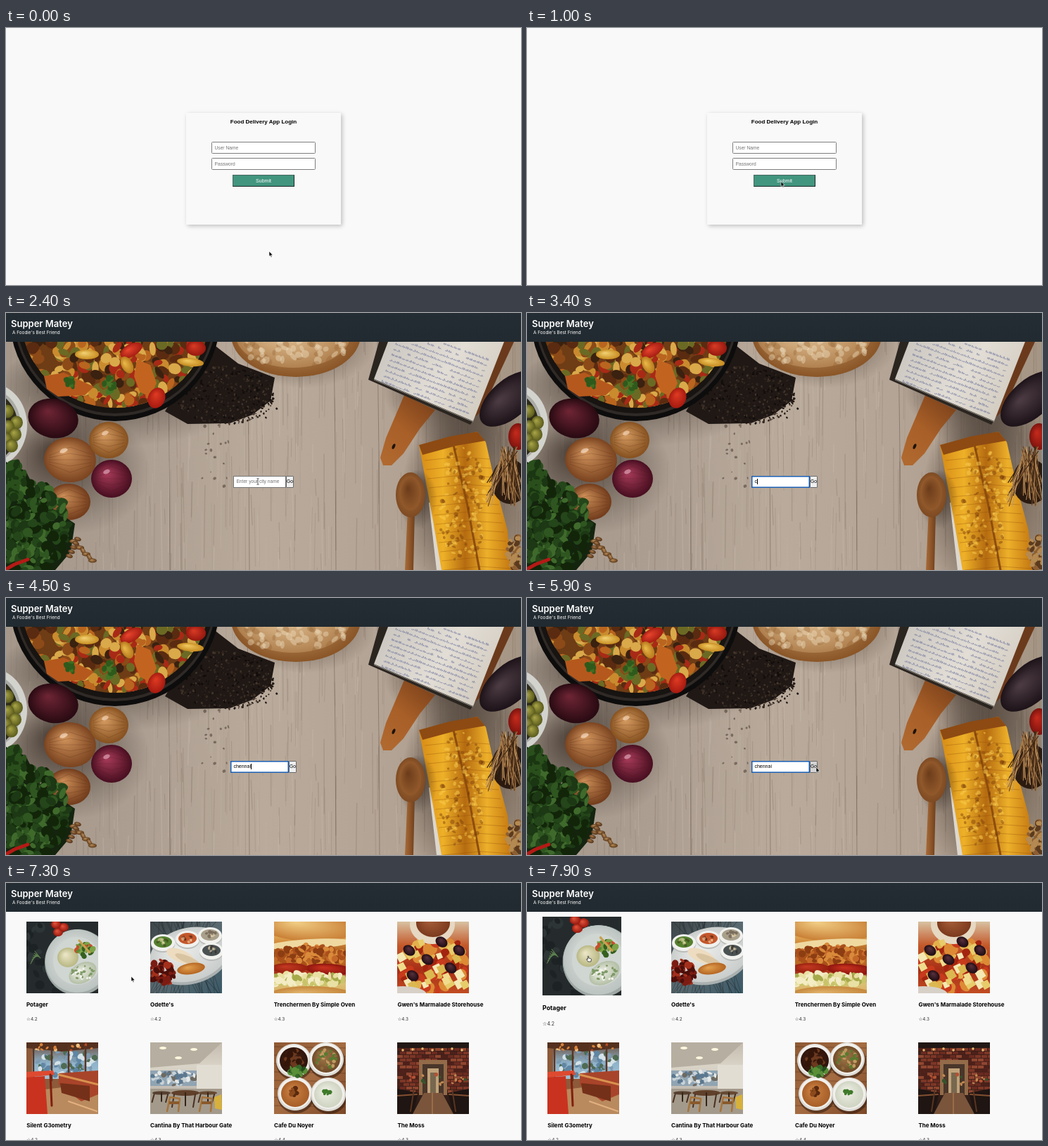
An HTML page with a canvas for the animation above (8000 ms loop, 732 by 366 pixels).

```html
<!DOCTYPE html>
<html lang="en">
<head>
<meta charset="utf-8">
<title>Food delivery demo</title>
<style>
html, body { margin: 0; width: 100%; height: 100%; overflow: hidden; background: #f9f9f9; }
#stage { position: relative; width: 732px; height: 366px; overflow: hidden; font: 6.67px "Liberation Sans", Arial, sans-serif; }
#stage * { box-sizing: border-box; }
.page, .abs { position: absolute; }
.page { inset: 0; background: #f9f9f9; }

#login { animation: login 8s step-end infinite; }
#search { animation: search 8s step-end infinite; }
#list { animation: list 8s step-end infinite; }
#head { left: 0; top: 0; width: 732px; height: 40.5px; background: linear-gradient(#242d33, #212a30); color: #fff; animation: head 8s step-end infinite; }
@keyframes login { 0% { visibility: visible; } 17.5%, 100% { visibility: hidden; } }
@keyframes search { 0% { visibility: hidden; } 17.5% { visibility: visible; } 76.25%, 100% { visibility: hidden; } }
@keyframes list { 0% { visibility: hidden; } 76.25%, 100% { visibility: visible; } }
@keyframes head { 0% { visibility: hidden; } 17.5%, 100% { visibility: visible; } }

#head b { left: 7px; top: 7px; font: 600 13px/17px Inter, sans-serif; white-space: nowrap; }
#head span { left: 9px; top: 23px; font: 6.4px/10px Inter, sans-serif; white-space: nowrap; }

#panel { left: 256px; top: 121px; width: 220px; height: 159px; background: #f9f9f9; box-shadow: 2px 2px 6px rgba(0,0,0,.24); }
#panel h1 { margin: 0; left: 0; top: 8px; width: 100%; text-align: center; font-size: 8px; line-height: 10px; }
.box { left: 36px; width: 148px; height: 17px; border: 1px solid #7d7d7d; border-radius: 1.5px; background: #fff; color: #757575; line-height: 15px; padding-left: 3.5px; }
#submit { left: 66px; top: 88px; width: 88px; height: 17px; background: #42957f; color: #fff; border: 1px solid; border-color: #47695f #1b2a26 #1b2a26 #47695f; text-align: center; font-size: 7px; line-height: 15px; animation: press 8s step-end infinite; }
@keyframes press { 11.25% { border-color: #1b2a26 #47695f #47695f #1b2a26; background: #3d8c77; } 12.5% { border-color: #47695f #1b2a26 #1b2a26 #47695f; background: #42957f; } }

#bar { left: 0; top: 232px; width: 732px; height: 16.5px; display: flex; justify-content: center; }
#field { position: relative; width: 75px; background: #fff; border: 1px solid #767676; display: flex; align-items: center; padding-left: 3.4px; line-height: 10px; animation: focus 8s infinite; }
@keyframes focus {
  0%, 36.9% { width: 75px; border-color: #767676; box-shadow: none; }
  38.2%, 100% { width: 83px; border-color: #1a5fb4; box-shadow: inset 0 0 0 .5px #1a5fb4; }
}
#hint { left: 3.4px; color: #757575; white-space: nowrap; animation: hint 8s step-end infinite; }
@keyframes hint { 0% { opacity: 1; } 42.5%, 100% { opacity: 0; } }
.key { font-size: 7px; max-width: 0; overflow: hidden; animation: key 8s step-end infinite; }
@keyframes key { 0% { max-width: 1em; } 50%, 100% { max-width: 0; } }
#caret { animation: caret 8s step-end infinite; }
#caret i { display: block; width: .7px; height: 8px; background: #000; animation: blink 1s .18s step-end infinite; }
@keyframes caret { 0% { opacity: 0; } 37.5%, 100% { opacity: 1; } }
@keyframes blink { 0% { opacity: 1; } 50%, 100% { opacity: 0; } }
#go { width: 11px; border: 1px solid #6b6b6b; border-radius: 1px; background: #efefef; line-height: 14.5px; display: flex; justify-content: center; animation: go 8s step-end infinite; }
@keyframes go { 73.5% { background: #d4d4d4; } 75% { background: #efefef; } }

.card { width: 140px; height: 140px; transform-origin: 70px 70px; white-space: nowrap; }
.card canvas { display: block; width: 102px; height: 102px; }
.card b { left: 0; top: 113px; font: 700 8px/10px Inter, sans-serif; color: #000; }
.card span { left: 0; top: 134px; font: 6.4px/10px Inter, sans-serif; color: #333; }
.card i { font: 6.6px/10px "DejaVu Sans", sans-serif; }
#card0 { animation: hover0 8s ease infinite; }
#card1 { animation: hover1 8s ease infinite; }
#card6 { animation: hover6 8s ease infinite; }
@keyframes hover0 { 0%, 92.4% { transform: none; } 97.4%, 100% { transform: scale(1.1); } }
@keyframes hover1 { 0%, 87% { transform: none; } 88.5% { transform: scale(1.02); } 90.8%, 100% { transform: none; } }
@keyframes hover6 { 0%, 77.1% { transform: none; } 82.7%, 85.6% { transform: scale(1.1); } 90.9%, 100% { transform: none; } }

#mouse { left: 0; top: 0; animation: mouse 8s ease-in-out infinite; }
#mouse svg { position: absolute; left: 0; top: 0; overflow: visible; }
@keyframes mouse {
  0%, .6% { transform: translate(374px, 318px); }
  6.25%, 7.9% { transform: translate(360.5px, 220px); }
  8.75%, 20% { transform: translate(361px, 218.5px); }
  27%, 62.5% { transform: translate(358px, 240px); }
  70%, 84.4% { transform: translate(411px, 241px); }
  90.6%, 91.6% { transform: translate(178px, 133px); }
  98%, 100% { transform: translate(87px, 104px); }
}
#arrow { animation: arrow 8s step-end infinite; }
#beam { animation: beam 8s step-end infinite; }
#hand { animation: hand 8s step-end infinite; }
@keyframes arrow { 0% { opacity: 1; } 25.5% { opacity: 0; } 68.5% { opacity: 1; } 76.25% { opacity: 0; } 85.6% { opacity: 1; } 92.4%, 100% { opacity: 0; } }
@keyframes beam { 0% { opacity: 0; } 25.5% { opacity: 1; } 42.5% { opacity: 0; } 62.5% { opacity: 1; } 68.5%, 100% { opacity: 0; } }
@keyframes hand { 0% { opacity: 0; } 76.25% { opacity: 1; } 85.6% { opacity: 0; } 92.4%, 100% { opacity: 1; } }
</style>
</head>
<body>
<div id="stage">
  <div id="list" class="page"></div>
  <div id="search" class="page">
    <canvas id="table" class="abs" style="left:0;top:0"></canvas>
    <div id="bar" class="abs">
      <div id="field"><span id="hint" class="abs">Enter your city name</span><span id="caret"><i></i></span></div>
      <div id="go">Go</div>
    </div>
  </div>
  <div id="head" class="abs"><b class="abs">Supper Matey</b><span class="abs">A Foodie's Best Friend</span></div>
  <div id="login" class="page">
    <div id="panel" class="abs">
      <h1 class="abs">Food Delivery App Login</h1>
      <div class="box abs" style="top:41px">User Name</div>
      <div class="box abs" style="top:64px">Password</div>
      <div id="submit" class="abs">Submit</div>
    </div>
  </div>
  <div id="mouse" class="abs">
    <svg id="arrow" width="6" height="9"><path d="M0 0V7.3L1.7 5.8 2.8 8.5 4 8 2.9 5.4H5.2Z" stroke="#fff" stroke-width=".6"/></svg>
    <svg id="beam" width="4" height="9"><path d="M-1.5-4.5Q0-4.5 0-3.5 0-4.5 1.5-4.5M0-3.5V3.5M-1.5 4.5Q0 4.5 0 3.5 0 4.5 1.5 4.5" fill="none" stroke="#222" stroke-width=".7"/></svg>
    <svg id="hand" width="8" height="9"><path d="M-.7.4Q0-.6.7.4V3L3.6 3.6Q4.6 4 4.4 5L3.8 8H-.2L-2.4 5Q-2.4 4-1.6 4.2L-.7 5Z" fill="#fff" stroke="#111" stroke-width=".7"/></svg>
  </div>
</div>
<script>
let seed = 11;
const rnd = (a = 1, b = 0) => {
  seed = (seed * 16807) % 2147483647;
  return b + (a - b) * seed / 2147483647;
};
const pick = list => list[Math.floor(rnd(list.length))];

function brush(cv, w, h, k) {
  cv.width = w * k;
  cv.height = h * k;
  const g = cv.getContext('2d');
  g.scale(k, k);
  g.lineCap = g.lineJoin = 'round';
  const trace = pts => {
    g.beginPath();
    for (let i = 0; i < pts.length; i += 2) g.lineTo(pts[i], pts[i + 1]);
  };
  const box = (fill, x, y, bw, bh) => { g.fillStyle = fill; g.fillRect(x, y, bw, bh); };
  const poly = (fill, ...pts) => { trace(pts); g.fillStyle = fill; g.fill(); };
  const line = (color, width, ...pts) => { trace(pts); g.strokeStyle = color; g.lineWidth = width; g.stroke(); };
  // a [light, dark] pair gives a rounded, lit look
  const oval = (fill, x, y, rx, ry = rx, rot = 0) => {
    g.save();
    g.translate(x, y);
    g.rotate(rot);
    g.scale(rx, ry);
    g.beginPath();
    g.arc(0, 0, 1, 0, 7);
    if (Array.isArray(fill)) {
      const shade = g.createRadialGradient(-.25, -.3, .05, 0, 0, 1);
      fill.forEach((c, i) => shade.addColorStop(i, c));
      fill = shade;
    }
    g.fillStyle = fill;
    g.fill();
    g.restore();
  };
  const fade = (x0, y0, x1, y1, ...colors) => {
    const f = g.createLinearGradient(x0, y0, x1, y1);
    colors.forEach((c, i) => f.addColorStop(i / (colors.length - 1), c));
    return f;
  };
  // random blobs inside an ellipse
  const bits = (n, colors, size, x, y, rx, ry = rx) => {
    while (n--) {
      const a = rnd(6.28), d = Math.sqrt(rnd());
      oval(pick(colors), x + Math.cos(a) * d * rx, y + Math.sin(a) * d * ry, rnd(size, size * .4), rnd(size, size * .3), rnd(3));
    }
  };
  return { g, box, poly, line, oval, fade, bits };
}

function paintTable({ g, box, poly, line, oval, fade, bits }) {
  box(fade(0, 0, 732, 0, '#a5988b', '#ac9e91', '#b9aa9b', '#b3a394', '#a59584'), 0, 0, 732, 366);
  for (let i = 0; i < 420; i++) {
    const x = rnd(732), y = rnd(366, -60), n = rnd(130, 20);
    line(pick(['rgba(84,66,52,.16)', 'rgba(222,210,196,.2)', 'rgba(110,92,76,.14)']), rnd(1.6, .4), x, y, x + rnd(2, -2), y + n);
  }
  for (const x of [232, 345, 468, 530]) line('rgba(70,54,42,.4)', .9, x - 2, 41, x, 200, x + 1, 366);
  bits(18, ['rgba(60,45,36,.5)'], 2.5, 300, 200, 30, 50);

  const shadow = ['rgba(25,15,10,.65)', 'rgba(25,15,10,0)'];
  oval(shadow, 165, 110, 180, 80);
  oval(shadow, 95, 225, 110, 90);
  oval(shadow, 660, 270, 100, 150);
  oval(shadow, 640, 140, 110, 60, .4);

  poly('#1f1815', 290, 41, 330, 72, 382, 92, 376, 125, 350, 145, 318, 157, 258, 158, 226, 140, 250, 100);
  bits(420, ['#120d0b', '#33271f', '#241b17', '#43342a'], 2, 312, 117, 70, 42);
  bits(50, ['#1c1512', '#2c211b'], 1.7, 330, 125, 62, 36);

  oval(['#241f1c', '#0d0c0c'], 155, 4, 150);
  oval('#302a27', 155, 3, 144);
  oval('#171412', 155, 2, 141);
  oval('#6e3c15', 155, 0, 135);
  g.save();
  g.beginPath();
  g.arc(155, 0, 135, 0, 7);
  g.clip();
  bits(300, ['#8c4a18', '#c98b2e', '#a82a16', '#5a2b10', '#6b6a24', '#d9a94a', '#3a2110', '#b9651f'], 10, 155, 70, 130, 66);
  g.restore();
  poly('#b5581d', 54, 90, 82, 85, 125, 105, 112, 117, 74, 119, 58, 108);
  poly('#c2641f', 186, 66, 205, 74, 214, 100, 205, 120, 190, 112, 182, 90);
  oval(['#dd3a22', '#a61a10'], 214, 121, 12, 15, .4);
  oval(['#e6442c', '#a51d12'], 178, 53, 17, 9, -.5);
  oval(['#d63a24', '#96180f'], 270, 50, 14, 11);
  oval(['#f0cf70', '#c98f22'], 115, 59, 17, 7);
  oval(['#f0c85e', '#c58a20'], 262, 70, 19, 6, .1);
  oval(['#e9b748', '#b87a1c'], 172, 74, 8, 13, -.5);
  bits(12, ['#2e5a1c', '#3f6d22'], 5, 90, 98, 9, 7);
  bits(16, ['#2e5a1c', '#467426'], 5, 148, 103, 9, 12);

  oval(shadow, 425, 45, 100, 62);
  oval(['#d9b487', '#8a5526'], 412, 31, 92, 60);
  oval(['#e3c79f', 'rgba(201,156,104,.5)'], 408, 30, 82, 48);
  bits(70, ['rgba(240,224,196,.4)', 'rgba(150,100,52,.35)'], 6, 410, 50, 76, 26);

  poly('#6b3a1c', 700, 41, 722, 41, 676, 140, 664, 150);
  poly(fade(535, 210, 605, 130, '#b0692f', '#a85f28', '#7e431b'), 566, 117, 610, 138, 588, 165, 565, 200, 548, 217, 536, 217, 532, 206, 540, 178);
  oval('#1e120b', 551, 190, 2, 4, .4);
  poly('#2b2520', 530, 41, 545, 41, 528, 92, 664, 153, 660, 159, 515, 95);
  poly(fade(540, 41, 690, 150, '#cbc7c0', '#e2ddd5', '#cfc8bc'), 543, 41, 708, 41, 664, 154, 523, 94);
  line('#8d8880', 1, 523, 95, 664, 155);
  for (let r = 0; r < 11; r++) {
    for (let x = 6; x < 128; x += 5) {
      const px = 556 - r * 2.8 + x, py = 20 + r * 7.6 + x * .37;
      if (py > 43 && rnd() > .12) line('rgba(72,82,140,.6)', .7, px, py, px + 1, py - rnd(3), px + 2, py + 1, px + 3, py - rnd(2), px + 4, py + 1);
    }
  }
  oval(['#4b3a42', '#1c1218'], 716, 122, 52, 27, -.72);

  const yellow = fade(590, 0, 715, 0, '#d88d17', '#eeb128', '#b56b10', '#edb02a', '#c77c13');
  poly('#ddd7cd', 601, 270, 612, 366, 626, 366, 612, 270);
  poly(yellow, 587, 188, 630, 178, 670, 169, 682, 184, 697, 250, 713, 310, 718, 366, 619, 366, 606, 290);
  poly('#8d4a12', 587, 188, 630, 176, 670, 169, 681, 182, 640, 189, 592, 202);
  line('#8d4d0e', 3, 636, 188, 655, 270, 673, 366);
  bits(150, ['rgba(120,60,10,.45)', 'rgba(250,205,80,.5)'], 3.5, 648, 272, 34, 84);
  for (let y = 205; y < 366; y += 13) line('rgba(140,75,10,.35)', 1.2, 593 + (y - 190) * .17, y + 5, 640 + (y - 190) * .2, y, 684 + (y - 190) * .2, y + 3);

  oval(['#c22a1c', '#7c120d'], 728, 176, 14, 19);
  oval('#2a1a10', 716, 240, 26, 32);
  for (let i = 0; i < 60; i++) line(pick(['#a57a4a', '#6b4526', '#c39a66', '#3f2815']), 1.2, 702 + rnd(25), 190 + rnd(20), 682 + rnd(55), 235 + rnd(42));
  bits(60, ['#8d5e31', '#5b3a1e', '#b48a52'], 5, 726, 342, 13, 24);

  oval(shadow, 585, 265, 28, 42);
  poly(fade(567, 0, 583, 0, '#a86b37', '#8a5328', '#643817'), 571, 280, 581, 280, 579, 366, 567, 366);
  oval(['#ad713c', '#7e4a22'], 575, 259, 21, 32);
  oval(['#6d3d1b', '#92592b'], 575, 257, 15, 24);

  oval('#d3d3ce', -22, 160, 52, 60);
  oval('#a9aaa5', -24, 161, 45, 53);
  oval('#2e2c18', -25, 162, 42, 50);
  for (const [x, y] of [[2, 140], [15, 156], [3, 162], [13, 173], [0, 180], [8, 189]]) oval(['#a7a346', '#5a5a1c'], x, y, 9, 9.5);

  oval(['#6c2433', '#280a12'], 67, 150, 36, 28, .2);
  oval(['#cf925b', '#7a431f'], 91, 209, 37, 32, .1);
  oval(['#d49a60', '#85501f'], 146, 181, 28, 26);
  oval(['#a63a58', '#470e20'], 150, 236, 29, 27);
  oval(['#cb8d56', '#713b1b'], 89, 269, 31, 26);
  for (const [x, y, w] of [[91, 209, 30], [146, 181, 22], [150, 236, 23], [89, 269, 25]])
    for (let i = -2; i < 3; i++) line('rgba(70,25,12,.25)', .8, x - w, y + i * 3, x, y + i * 9, x + w, y + i * 4);
  oval('rgba(255,235,215,.6)', 82, 196, 6, 3, -.4);
  oval('rgba(255,235,215,.5)', 141, 171, 5, 3, -.4);
  oval('rgba(240,200,215,.5)', 143, 226, 5, 3, -.4);

  poly('#14240f', 0, 212, 28, 225, 50, 268, 98, 300, 92, 340, 70, 366, 0, 366);
  bits(260, ['#1c3814', '#2f5620', '#122509', '#3f6a2c', '#24461a'], 9, 34, 305, 54, 66);
  bits(60, ['#2a4f1c', '#1b3612'], 8, 10, 238, 17, 26);
  for (let i = 0; i < 7; i++) oval(['#b58a58', '#5c3819'], 96 + i * 4.5, 325 + i * 4.6, 6, 3, i % 2);
  for (let i = 0; i < 5; i++) oval(['#a57848', '#51311a'], 102 - i * 3, 322 + i * 6, 5, 3, .3);
  line('#b51a16', 5, -2, 366, 12, 358, 31, 351);
}

const dishes = [
  ({ box, oval, line, bits }) => {
    box('#252b2c', 0, 0, 102, 102);
    bits(40, ['#1d2324', '#2d3536'], 8, 40, 50, 50);
    oval('#9fa7a5', 73, 58, 47);
    oval(['#e2e5e1', '#bcc4c1'], 72, 56, 45);
    oval('#d0d6d2', 72, 56, 34);
    oval(['#ebe6c6', '#b9b884'], 59, 51, 15, 14);
    bits(24, ['#5d8a35', '#35601f', '#c7502c', '#7fa348'], 5, 84, 40, 12, 10);
    line('#c8a04e', 3, 75, 27, 90, 44);
    oval(['#eef0e4', '#b4bfa6'], 80, 73, 21, 14, -.5);
    bits(26, ['#7f9a68', '#f4f5ee'], 2.5, 80, 73, 16, 10);
    for (const [x, y] of [[45, 15], [53, 8], [42, 4]]) oval(['#e2543c', '#98190f'], x, y, 7, 6);
    for (let i = 0; i < 7; i++) line('#5f8350', 1, 6 + i, 60 - i * 3, 14 + i, 46 + i);
  },
  ({ box, oval, line, bits, fade }) => {
    box(fade(0, 0, 102, 102, '#3d4548', '#5a6a70', '#3c5a68'), 0, 0, 102, 102);
    for (let i = 0; i < 30; i++) line('rgba(30,38,42,.4)', 1, rnd(102), 0, rnd(102), 102);
    oval('#aab0b0', 56, 50, 58, 39, -.25);
    oval(['#eceeec', '#c9cdcb'], 55, 47, 57, 38, -.25);
    const bowls = [[18, 30, '#56802f'], [53, 25, '#c4572c'], [85, 20, '#a9a08c'], [87, 42, '#4a5152']];
    for (const [x, y, c] of bowls) {
      oval('#b9bcb9', x, y + 2, 17, 12);
      oval('#f1f1ee', x, y, 17, 12);
      oval(c, x, y - 1, 13, 8);
      bits(9, ['rgba(255,235,190,.5)', 'rgba(40,20,10,.35)'], 3, x, y - 1, 9, 5);
    }
    oval('#eddcc0', 43, 49, 21, 9, .4);
    oval('#d9c4a2', 53, 54, 19, 5, .4);
    oval(['#e2a04e', '#b46522'], 58, 67, 20, 8, -.15);
    bits(60, ['#7c1c12', '#4d0f0b', '#a3301c'], 6, 17, 73, 17, 18);
  },
  ({ box, oval, bits, fade }) => {
    box(fade(0, 0, 0, 102, '#c98235', '#e9b967', '#d28d3c', '#a85a1e', '#bd6c25', '#a8301a', '#d9c277', '#dcae62'), 0, 0, 102, 102);
    oval(['#f0cb82', '#c98036'], 48, 8, 68, 20, .05);
    oval('#efd9a0', 50, 32, 60, 7, -.06);
    bits(150, ['#c4682a', '#8c3d12', '#d98a3a', '#a9501b'], 6, 51, 48, 54, 13);
    oval(['#c8321f', '#8a150e'], 78, 68, 34, 8, .06);
    oval(['#c43a22', '#97200f'], 22, 66, 26, 7);
    bits(100, ['#e9e0a4', '#c9c46a', '#f3ecc4', '#a6aa4a'], 7, 48, 82, 54, 9);
    oval(['#e2b46c', '#c5873c'], 52, 106, 62, 14);
  },
  ({ box, oval, poly, bits, fade }) => {
    box(fade(0, 0, 0, 102, '#d8c2a2', '#c4592a', '#a82f16', '#c24d22'), 0, 0, 102, 102);
    bits(60, ['#c83a1c', '#dd8a35', '#a3240f', '#e2b04c'], 10, 51, 60, 52, 40);
    oval('#e6d8c2', 50, 4, 32, 28);
    oval(['#a8603a', '#7c3a1e'], 51, 2, 24, 20);
    for (let i = 0; i < 24; i++) {
      const x = rnd(98, 2), y = rnd(92, 28), s = rnd(9, 5);
      poly(pick(['#f0dc8c', '#e8cc6a', '#f4e8b4', '#dcb850']), x - s, y - 3, x + 2, y - s, x + s, y + 2, x - 2, y + s);
    }
    for (const [x, y] of [[17, 41], [43, 54], [63, 29], [88, 41], [76, 66], [22, 77]]) oval(['#57303c', '#1e0c14'], x, y, 9, 7, .6);
    oval('#d7d0c6', 8, 104, 34, 12);
  },
  ({ box, poly, line, bits, fade }) => {
    box('#8d5a3a', 0, 0, 102, 102);
    box(fade(0, 0, 0, 60, '#6a4a38', '#8fb4cc', '#a9c6d4'), 8, 6, 94, 46);
    bits(70, ['#5f86a4', '#d5e2e8', '#4f6b52', '#7d9ab0'], 5, 56, 30, 46, 18);
    poly('#54301e', 0, 0, 102, 0, 102, 8, 50, 13, 0, 8);
    bits(16, ['#d9813a', '#f0c080', '#b54a22'], 3, 50, 7, 50, 5);
    for (const x of [10, 36, 60, 84]) line('#5a3423', 2.5, x, 6, x, 54);
    poly('#b98a5e', 0, 70, 102, 58, 102, 102, 0, 102);
    poly('#a8442a', 46, 44, 102, 40, 102, 74, 78, 84, 46, 60);
    poly('#743019', 48, 58, 90, 62, 90, 84, 50, 72);
    line('#d8924f', 3, 46, 46, 102, 60);
    poly('#c9321f', 0, 50, 26, 48, 30, 102, 0, 102);
    poly('#de4a30', 0, 42, 38, 40, 40, 46, 0, 50);
    line('#80200f', 3, 34, 46, 36, 90);
    line('#e3b080', 2, 60, 84, 100, 98);
  },
  ({ box, oval, poly, line, bits, fade }) => {
    box(fade(0, 0, 0, 102, '#c4bcae', '#dad4c8', '#c0bab0', '#8d8880'), 0, 0, 102, 102);
    poly('#b6aea0', 0, 0, 102, 0, 70, 30, 0, 36);
    for (const [x, y] of [[18, 8], [62, 10], [40, 22]]) oval('#fff7de', x, y, 5, 2);
    box('#90a4b2', 0, 40, 66, 22);
    bits(60, ['#5b7890', '#c7d2d8', '#6e6a62', '#e5e8e6'], 4, 34, 51, 34, 10);
    box('#e2ddd3', 66, 32, 36, 38);
    poly('#a39a8c', 0, 66, 102, 66, 102, 102, 0, 102);
    for (const [x, y, s, c] of [[50, 72, 20, '#60402a'], [16, 72, 13, '#574030'], [82, 72, 13, '#674a32']]) {
      oval(c, x, y, s, s * .2);
      line('#33241a', 2, x, y, x, y + s * .9);
      for (const d of [-.8, .7]) line('#4a3020', 2, x + s * d, y + 2, x + s * d - 3, y + s);
    }
    for (const x of [24, 70]) {
      line('#a5743c', 2.5, x, 98, x + 4, 78, x + 18, 80, x + 16, 98);
      box('#8a5a2c', x + 3, 84, 14, 4);
    }
    poly('#d7b13c', 91, 78, 101, 74, 102, 96, 92, 94);
  },
  ({ box, oval, line, bits, fade }) => {
    box(fade(0, 0, 102, 102, '#8f5a34', '#a56c42', '#7c4828'), 0, 0, 102, 102);
    for (let y = 6; y < 102; y += 12) line('rgba(70,36,18,.4)', 1, 0, y, 102, y + 2);
    const bowls = [[28, 26, '#4a2516', '#2e140c'], [74, 24, '#a47a4a', '#6e4a28'], [30, 73, '#cf8446', '#a75f28'], [77, 74, '#eef0e4', '#cfd4c2']];
    for (const [x, y, light, dark] of bowls) {
      oval('rgba(40,18,8,.5)', x + 1, y + 3, 26, 25);
      oval('#dcdad4', x, y, 25, 24);
      oval('#f2f0ec', x, y - 1, 23, 22);
      oval([light, dark], x, y, 20, 19);
    }
    bits(30, ['#6d3a20', '#331609'], 5, 28, 24, 15, 13);
    bits(40, ['#8c6a3e', '#c09a62', '#5a7a30'], 3, 74, 24, 16, 14);
    bits(14, ['#5a2a10', '#8c4a1c'], 4, 28, 70, 6, 7);
    bits(14, ['#3f7a2a', '#6aa044'], 3, 75, 70, 6, 4);
    bits(30, ['#36682a', '#5a8f38', '#234a1a'], 5, 33, 41, 11, 6);
  },
  ({ box, poly, line, oval, bits, fade }) => {
    box(fade(0, 0, 0, 102, '#281a16', '#54261d', '#3b211a', '#1e1715'), 0, 0, 102, 102);
    for (let y = 8; y < 70; y += 5)
      for (let x = y % 2 * 4; x < 102; x += 9) box(pick(['#6a2a20', '#7d3626', '#4d2019', '#8f4630']), x, y, 8, 4);
    poly('#211815', 0, 0, 102, 0, 102, 8, 0, 8);
    for (let x = 8; x < 102; x += 14) oval('#e9b56a', x, 9 + x % 3, 1.7);
    box('#936b49', 31, 25, 40, 50);
    box('#49362a', 36, 31, 30, 44);
    box('#c0a27a', 43, 37, 16, 35);
    box('#77674e', 47, 43, 8, 29);
    poly('#7a553b', 38, 72, 64, 72, 80, 102, 22, 102);
    line('#b98658', 1, 50, 72, 50, 102);
    for (const [x, d] of [[0, 1], [102, -1]]) {
      poly('#1f1512', x, 66, x + d * 30, 72, x + d * 22, 102, x, 102);
      line('#835032', 2, x, 76, x + d * 28, 74);
      line('#593521', 2, x + d * 24, 66, x + d * 19, 98);
    }
    bits(18, ['#35552c', '#c48a52', '#b55334'], 3, 50, 52, 48, 8);
  }
];

const places = [
  ['Potager', 4.2], ["Odette's", 4.2], ['Trenchermen By Simple Oven', 4.3], ["Gwen's Marmalade Storehouse", 4.3],
  ['Silent G3ometry', 4.2], ['Cantina By That Harbour Gate', 4.3], ['Cafe Du Noyer', 4.4], ['The Moss', 4.3]
];

paintTable(brush(document.getElementById('table'), 732, 366, 1));

const list = document.getElementById('list');
places.forEach(([name, stars], i) => {
  const card = document.createElement('div');
  card.id = 'card' + i;
  card.className = 'card abs';
  card.style.left = 29.3 + i % 4 * 175.7 + 'px';
  card.style.top = (i < 4 ? 54.8 : 226.5) + 'px';
  card.innerHTML = `<canvas></canvas><b class="abs">${name}</b><span class="abs"><i>☆</i>${stars}</span>`;
  list.append(card);
  dishes[i](brush(card.firstChild, 102, 102, 2));
});

const caret = document.getElementById('caret');
[...'chennai'].forEach((ch, i) => {
  const key = document.createElement('span');
  key.className = 'key';
  key.textContent = ch;
  key.style.animationDelay = 3.4 + i * .13 + 's';
  caret.before(key);
});
</script>
</body>
</html>
```
